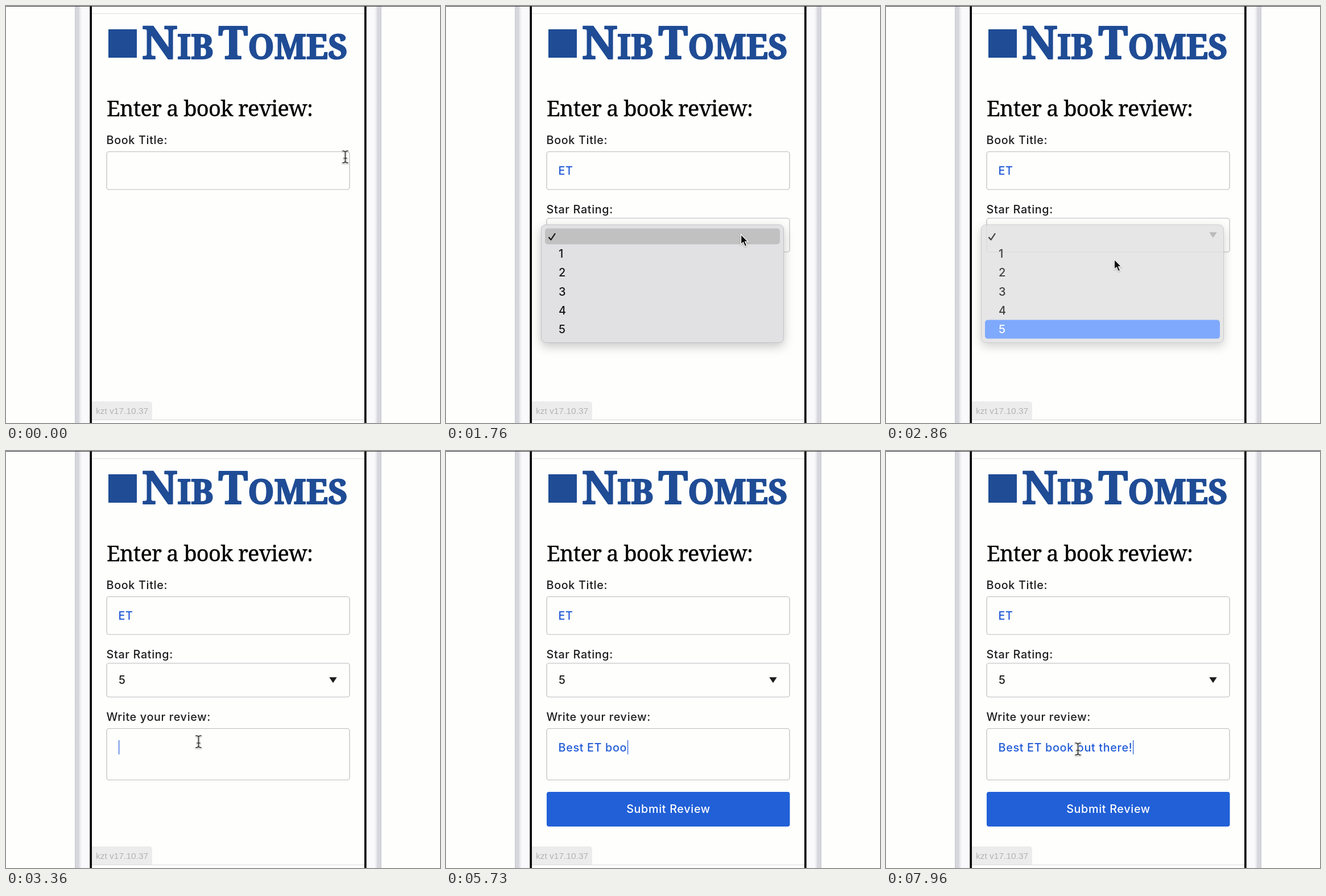
Animation of 763x734 px, one loop 8 s. Source, as an HTML page:

```html
<!DOCTYPE html>
<html lang="en">
<head>
<meta charset="utf-8">
<title>Book review form</title>
<style>
  html, body { margin: 0; width: 100%; height: 100%; overflow: hidden; background: #fefefd; }
  svg { display: block; width: 763px; height: 734px; }
  text { white-space: pre; font: 450 19.8px Inter, sans-serif; letter-spacing: .65px; fill: #1c1c1e; }
  .logo { font: 700 59px "Noto Serif", serif; letter-spacing: 0; fill: #1f4c95; stroke: #1f4c95; stroke-width: 2; stroke-linejoin: round; }
  .logo .big { font-size: 79px; }
  .head { font: 38px "Noto Serif", serif; letter-spacing: -.72px; fill: #000; stroke: #000; stroke-width: .4; }
  .badge { font: 15.5px "Liberation Sans", Arial, sans-serif; letter-spacing: 0; fill: #b3b3b6; }
  .typed { fill: #205bd6; }
  .field { fill: #fefefd; stroke: #bcbcbe; stroke-width: 1.2; }
  .caret { fill: #205bd6; }
  .row text { font-size: 20px; letter-spacing: 0; fill: #161617; }
  .row rect { fill: none; }
  .row.hot rect { fill: #6296fd; }
  .row.hot text { fill: #fff; }
  .blank.hot rect { fill: #c1c1c2; }
  .panel { fill: #e1e1e3; stroke: #c2c2c5; filter: drop-shadow(0 6px 9px rgba(0, 0, 0, .22)); }
  #menu { animation: fade 8s linear infinite; }
  #pointer { animation: glide 8s linear infinite; filter: drop-shadow(0 1px 1px rgba(0, 0, 0, .3)); }

  @keyframes fade {
    0%, 35.25% { opacity: 1; }
    38%, 100% { opacity: 0; }
  }
  @keyframes glide {
    0%, .375% { transform: translate(596px, 265px); }
    3.25%, 16.25% { transform: translate(493px, 302px); }
    19.5%, 26.625% { transform: translate(518px, 402px); }
    28.25% { transform: translate(452px, 511px); }
    31.25%, 34.125% { transform: translate(430px, 565px); }
    35.75% { transform: translate(401px, 446px); }
    36.75% { transform: translate(390px, 432px); }
    40%, 98.75% { transform: translate(338px, 511px); }
    99.5%, 100% { transform: translate(337px, 524px); }
  }
</style>
</head>
<body>
<svg viewBox="0 0 763 734">
  <defs>
    <linearGradient id="rim">
      <stop offset="0" stop-color="#c9c9cf"/>
      <stop offset=".08" stop-color="#d6d6dd"/>
      <stop offset=".25" stop-color="#d6d6dd"/>
      <stop offset=".34" stop-color="#ebebf0"/>
      <stop offset=".46" stop-color="#f9f9fb"/>
      <stop offset="1" stop-color="#fbfbfd"/>
    </linearGradient>
    <g id="side">
      <rect x="121" width="27" height="734" fill="url(#rim)"/>
      <rect x="147.300" width="3.700" height="734" fill="#060606"/>
    </g>
    <path id="ibeam" d="M-4 -10Q-.5 -10 .5 -8Q1.500 -10 5 -10M.5 -8V9M-4 11Q-.5 11 .5 9Q1.500 11 5 11M-2 3H3"/>
  </defs>

  <use href="#side"/>
  <use href="#side" transform="translate(781 0) scale(-1 1)"/>
  <rect width="763" height="1" fill="#38383a"/>
  <path d="M151 13.5H630M151 728.5H630" stroke="#dcdcde"/>
  <path d="M151 696H251q6 0 6 6V728H151Z" fill="#ececec"/>
  <text class="badge" x="158" y="718">kzt v17.10.37</text>

  <rect x="180" y="41" width="50" height="50" fill="#1f4c95"/>
  <text class="logo" x="239" y="92.500"><tspan class="big">N</tspan>IB<tspan class="big" dx="9">T</tspan>OMES</text>
  <text class="head" x="177" y="194">Enter a book review:</text>

  <text x="176.5" y="243">Book Title:</text>
  <rect class="field" x="177" y="256.5" width="427" height="66.5" rx="4"/>
  <text class="typed" id="title" x="197.5" y="297"></text>
  <rect class="caret" id="titleCaret" y="278" width="1.2" height="25"/>

  <g id="rating">
    <text x="176.5" y="364.5">Star Rating:</text>
    <rect class="field" x="177" y="373.5" width="427" height="59.5" rx="4"/>
    <path d="M568.300 398.300H581.700L575 408.300Z" fill="#1b1b1c"/>
    <text id="stars" x="198" y="410">5</text>
  </g>

  <g id="review">
    <text x="176.5" y="474.5">Write your review:</text>
    <rect class="field" x="177" y="488.5" width="427" height="90.5" rx="4"/>
    <text class="typed" id="body" x="197.5" y="528.5"></text>
    <rect class="caret" id="bodyCaret" y="509" width="1.2" height="25"/>
  </g>

  <g id="submit">
    <rect x="177" y="600" width="427.500" height="61" rx="4" fill="#2160d7"/>
    <text x="391" y="637" text-anchor="middle" style="fill:#fff">Submit Review</text>
  </g>

  <g id="menu">
    <rect class="panel" x="167.500" y="385" width="426" height="207.500" rx="8"/>
    <g id="rows">
      <g class="row blank">
        <rect x="174" y="391.500" width="413" height="28" rx="5"/>
        <path d="M181 407.500L184.500 411.500L191.500 401" fill="none" stroke="#111" stroke-width="2.200" stroke-linecap="round" stroke-linejoin="round"/>
      </g>
    </g>
  </g>

  <g id="pointer">
    <path id="arrow" d="M.5 0V17.500L4.500 14L7.500 21L10.800 19.600L7.800 12.800H13Z" fill="#0b0b0b" stroke="#fff" stroke-width="1.300"/>
    <g id="beam" fill="none" stroke-linecap="round">
      <use href="#ibeam" stroke="#fff" stroke-width="3.200"/>
      <use href="#ibeam" stroke="#333" stroke-width="1.700"/>
    </g>
  </g>
</svg>
<script>
  const LOOP = 8000;
  const $ = id => document.getElementById(id);

  // Visible time spans in ms, as start/end pairs.
  const spans = {
    rating: [1130, LOOP],
    stars: [2900, LOOP],
    review: [2990, LOOP],
    submit: [4200, LOOP],
    menu: [1730, 3040],
    titleCaret: [260, 1160, 1530, 1730],
    bodyCaret: [3360, 3760, 4130, 7500, 7900, LOOP],
    arrow: [1355, 3124],
    beam: [0, 630, 1300, 1355, 3124, 4130, 7660, LOOP]
  };

  const typing = [
    { id: 'title', text: 'ET', keys: [630, 760] },
    { id: 'body', text: 'Best ET book out there!', keys: [
      4130, 4400, 4470, 4560, 4630, 4800, 4930, 5060, 5460, 5600, 5730, 5860,
      5960, 6100, 6230, 6300, 6360, 6500, 6560, 6600, 6660, 6730, 7060] }
  ];

  // Highlighted menu row from a given time on; -1 is none.
  const hover = [[0, 0], [2130, 1], [2170, 2], [2210, 3], [2240, 4], [2320, 5], [2740, -1], [2790, 5]];

  for (let n = 1; n <= 5; n++) {
    const y = 419.6 + 33.25 * (n - 1);
    $('rows').insertAdjacentHTML('beforeend',
      `<g class="row"><rect x="174" y="${y}" width="413" height="33" rx="5"/>` +
      `<text x="198" y="${y + 23.5}">${n}</text></g>`);
  }
  const rows = [...$('rows').children];

  const within = (t, list) => list.filter(edge => edge <= t).length % 2 === 1;

  function draw(t) {
    // Visibility, unlike display, keeps the CSS animations running.
    for (const id in spans) $(id).style.visibility = within(t, spans[id]) ? '' : 'hidden';

    for (const { id, text, keys } of typing) {
      const el = $(id);
      const shown = text.slice(0, keys.filter(k => k <= t).length);
      if (el.textContent !== shown) el.textContent = shown;
      const width = shown ? el.getComputedTextLength() : 0;
      $(id + 'Caret').setAttribute('x', 198 + Math.round(width));
    }

    const active = hover.filter(h => h[0] <= t).pop()[1];
    rows.forEach((row, i) => row.classList.toggle('hot', i === active));
  }

  let start;
  function tick(now) {
    start ??= now;
    draw((now - start) % LOOP);
    requestAnimationFrame(tick);
  }
  draw(0);
  requestAnimationFrame(tick);
</script>
</body>
</html>
```
